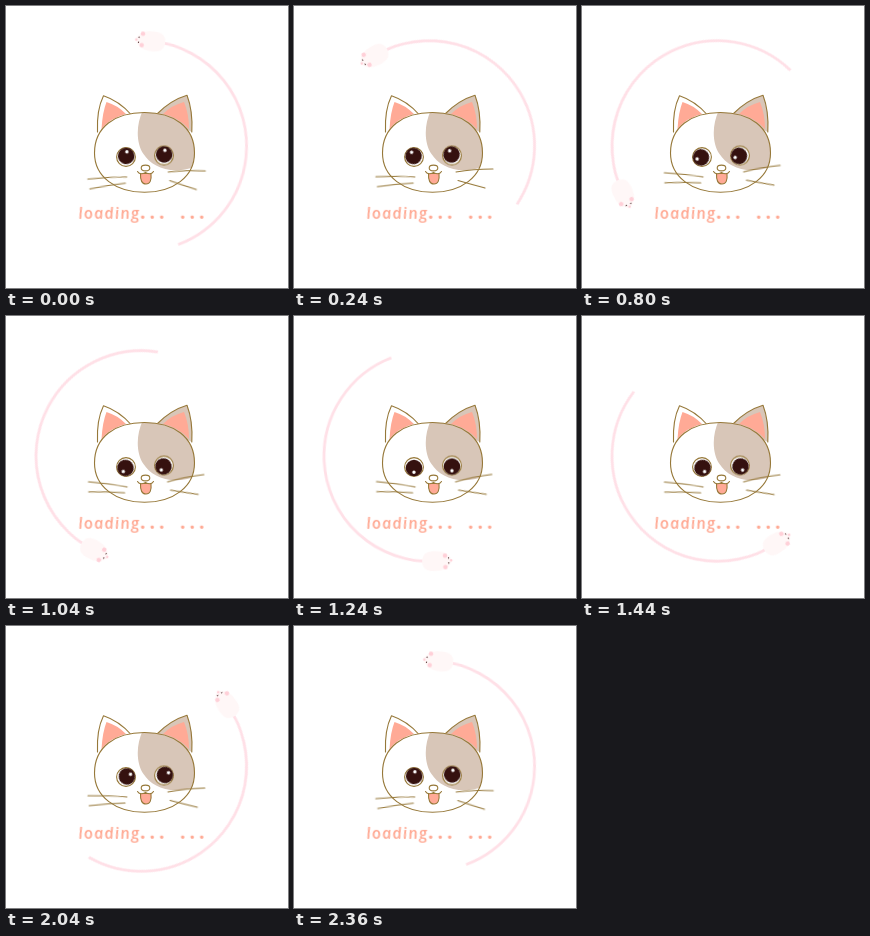
Animation, 282 px wide and 282 px high, one loop 2.4 s. Source, as an HTML page without scripts:

```html
<!DOCTYPE html>
<html lang="en">
<head>
<meta charset="utf-8">
<title>Loading cat</title>
<style>
  html, body { margin: 0; width: 100%; height: 100%; overflow: hidden; background: #fff; }
  svg { display: block; width: 100%; height: 100%; }

  /* 60 poses per loop; the last one coincides with the first */
  .spin { animation: spin 2.4s steps(60, jump-none) infinite; }
  .trail {
    fill: none; stroke: #ffe0e7; stroke-width: 2.8;
    animation: trail 1.2s ease-in-out infinite alternate;
  }
  .whiskers { animation: sway 1.2s ease-out infinite alternate; }
  .left { --from: -6deg; --to: 5deg; }
  .right { --from: 3deg; --to: -7deg; }

  @keyframes spin { to { transform: rotate(-360deg); } }
  @keyframes trail {
    from { stroke-dasharray: 153 360; }
    to { stroke-dasharray: 161.5 360; }
  }
  @keyframes sway {
    from { transform: rotate(var(--from)); }
    to { transform: rotate(var(--to)); }
  }

  .line { fill: none; stroke: #967839; stroke-width: 1.1; stroke-linecap: round; stroke-linejoin: round; }
  .white { fill: #fff; }
  .beige { fill: #d8c6b8; }
  .pink { fill: #ffaa96; }
  .blush { fill: #ffd0d8; }
  .dark { fill: #35110f; }
  .soft { filter: blur(.6px); }
  text { font: italic 600 16px "Open Sans", "Noto Sans", sans-serif; letter-spacing: 1.1px; fill: #ffa892; }
  .dots { font-size: 20px; font-weight: 700; letter-spacing: 3.8px; }
</style>
</head>
<body>
<svg viewBox="0 0 282 282">
  <defs>
    <path id="head" d="M88.500 147C88.500 121 109 106.500 138.500 106.500S188.500 121 188.500 147C188.500 171 167 186.300 138.500 186.300S88.500 171 88.500 147Z"/>
    <clipPath id="face"><use href="#head"/></clipPath>
    <g id="pupil" transform="rotate(10)">
      <circle class="dark" r="8.300" cy="-1"/>
      <circle class="white" r="1.700" cy="-5.200"/>
    </g>
  </defs>

  <g transform="translate(135.3 140)">
    <g class="spin">
      <g transform="rotate(6.5)">
        <circle class="trail" r="105.3" pathLength="360" transform="rotate(-90)"/>
        <g transform="translate(0 -105.3)">
          <path fill="#fff7f7" d="M-18 0C-15 -7 -9 -10 0 -10C9 -10 12 -6 12 0S9 10 0 10C-9 10 -15 7 -18 0Z"/>
          <circle class="blush" cx="-11" cy="-6.500" r="2.200"/>
          <circle class="blush" cx="-11" cy="5" r="2.200"/>
          <circle class="blush" cx="-17" r="1.300"/>
          <circle class="dark" cx="-14.500" cy="-2.500" r=".6"/>
          <circle class="dark" cx="-14.500" cy="2.500" r=".6"/>
        </g>
      </g>
    </g>
  </g>

  <path class="line white" d="M91.500 126Q90.500 104 97.500 89.800Q113 95 125 108.500"/>
  <path class="pink" d="M95.500 123Q96.500 106 100.500 96Q111 99 120 108Q104 112 95.500 123Z"/>
  <path class="line beige" d="M151 108Q165 94 181 89.300Q187 105 185.800 126"/>
  <path class="pink" d="M157 108Q166 99 178 96Q183 108 183 123Q172 111 157 108Z"/>

  <use href="#head" class="white"/>
  <g clip-path="url(#face)">
    <path class="beige soft" d="M138 102C129.500 118 130 137 137.500 148C146 161 165 170 192 160V102Z"/>
  </g>
  <use href="#head" class="line"/>

  <g transform="translate(120 151)">
    <circle class="line white" r="9.400"/>
    <g class="spin"><use href="#pupil"/></g>
  </g>
  <g transform="translate(158 149.500)">
    <circle class="line white" r="9.400"/>
    <g class="spin"><use href="#pupil"/></g>
  </g>

  <path class="line pink" d="M134.500 167.500Q134 178 140 178T145 167.500Z"/>
  <path class="line white" d="M131.500 165.500Q134 169.500 139.500 166.500Q145 169.500 147.500 165.500"/>
  <ellipse class="line white" cx="139.500" cy="162" rx="4.300" ry="2.900"/>

  <g transform="translate(121 173)">
    <path class="line whiskers left" d="M0 -2Q-18 -4 -39 -4M-2 4Q-18 4 -38 6"/>
  </g>
  <g transform="translate(161 170)">
    <path class="line whiskers right" d="M1 -4Q18 -7 38 -7M3 4.500Q15 8 30 12"/>
  </g>

  <g transform="translate(73 213) skewX(8)">
    <text>loading<tspan class="dots" x="62">...</tspan><tspan class="dots" x="102">...</tspan></text>
  </g>
</svg>
</body>
</html>
```
